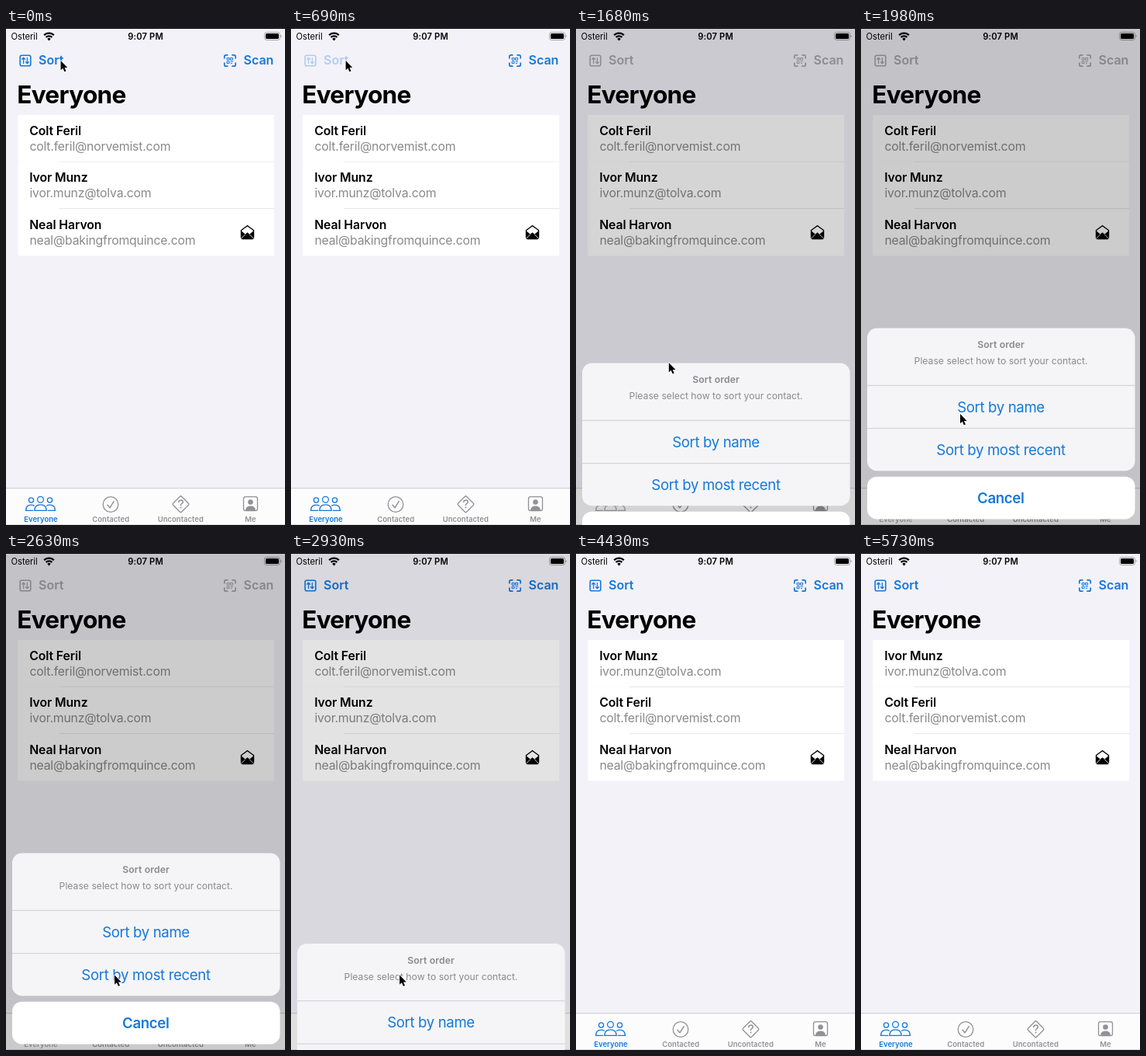
An HTML page for the animation above (5.98 s loop, 360 px wide and 640 px high).

```html
<!DOCTYPE html>
<html lang="en">
<head>
<meta charset="utf-8">
<title>Sorting contacts</title>
<style>
  html, body { margin: 0; width: 100%; height: 100%; overflow: hidden; background: #f3f2f9; }
  svg { display: block; width: 100%; height: 100%; }
  text { font-family: Inter, Roboto, "Liberation Sans", sans-serif; font-optical-sizing: none; }
  .status { font-size: 11.2px; }
  .time { font-size: 11.2px; font-weight: 600; letter-spacing: .15px; }
  .nav { font-size: 16px; font-weight: 600; }
  .title { font-size: 31.6px; font-weight: 700; letter-spacing: -.7px; }
  .name { font-size: 15.8px; font-weight: 600; letter-spacing: -.1px; }
  .mail { font-size: 15.8px; letter-spacing: -.2px; fill: #8a8a8d; }
  .tab { font-size: 9.5px; font-weight: 600; }
  .head { font-size: 12.2px; font-weight: 600; letter-spacing: .15px; fill: #8a8a8e; }
  .note { font-size: 12.2px; fill: #8a8a8e; }
  .choice { font-size: 18.6px; letter-spacing: -.35px; fill: #1578db; }
  .cancel { font-weight: 600; }
  .mid { text-anchor: middle; }
  .line { fill: none; stroke: currentColor; stroke-width: 1.3; stroke-linecap: round; stroke-linejoin: round; }
  .fill { fill: currentColor; }
</style>
</head>
<body>
<svg viewBox="0 0 360 640" xmlns="http://www.w3.org/2000/svg">
  <rect width="360" height="640" fill="#f3f2f9"/>

  <!-- status bar -->
  <text class="status" x="6.5" y="15">Osteril</text>
  <g fill="none" stroke="#000" stroke-width="2.3">
    <path d="M49.2 9.3a8.6 8.6 0 0 1 12.6 0"/>
    <path d="M51.6 12a5.3 5.3 0 0 1 7.8 0"/>
  </g>
  <path d="M55.5 16.4l-2.2-2.4a3 3 0 0 1 4.4 0z"/>
  <text class="time mid" x="180" y="15">9:07 PM</text>
  <rect x="333.5" y="5.5" width="20" height="10" rx="2.8" fill="none" stroke="#a4a4a8"/>
  <rect x="335" y="7" width="17" height="7" rx="1.5"/>
  <path d="M354.6 8.8v3.4q1.3-.5 1.3-1.7t-1.3-1.7z" fill="#a4a4a8"/>

  <!-- navigation bar -->
  <g id="sort">
    <rect class="line" x="18.2" y="35.2" width="13.6" height="13.6" rx="2" style="stroke-width:1.6"/>
    <path class="line" d="M22.6 45.5v-7M20.7 40.3l1.9-2 1.9 2M27.4 38.5v7M25.5 43.7l1.9 2 1.9-2"/>
    <text class="nav fill" x="42" y="47.3">Sort</text>
  </g>
  <g id="scan">
    <path class="line" style="stroke-width:1.7" d="M281.8 38.8v-2q0-2 2-2h2M292 34.8h2.2q2 0 2 2v2M296.2 45v2.2q0 2-2 2H292M285.8 49.2h-2q-2 0-2-2V45"/>
    <path class="line" style="stroke-width:1" d="M285.5 38.5h2.6v2.6h-2.6zM290 38.5h2.6v2.6H290zM285.5 43h2.6v2.6h-2.6zM290 43.2h2.6M290.4 45.6h1.2"/>
    <text class="nav fill" x="306.5" y="47.3">Scan</text>
  </g>
  <text class="title" x="14.2" y="97">Everyone</text>

  <g id="list"></g>

  <!-- tab bar -->
  <rect y="593" width="360" height="47" fill="#fcfcfd"/>
  <rect y="592.4" width="360" height=".8" fill="#c4c4c8"/>
  <rect y="639" width="360" height="1" fill="#dcdce0"/>
  <g id="everyone">
    <circle class="line" cx="44.5" cy="607.2" r="3.9"/>
    <path class="line" d="M36.8 621.4q0-7.6 7.7-7.6t7.7 7.6z"/>
    <circle class="line" cx="32.5" cy="608" r="3.1"/>
    <path class="line" d="M34.8 621.4h-9.2q0-7.3 6.9-7.3 2.4 0 3.9 1.1"/>
    <circle class="line" cx="56.5" cy="608" r="3.1"/>
    <path class="line" d="M54.2 621.4h9.2q0-7.3-6.9-7.3-2.4 0-3.9 1.1"/>
    <text class="tab fill mid" x="45" y="636.4">Everyone</text>
  </g>
  <g color="#929296">
    <circle class="line" cx="135" cy="613.5" r="9.8"/>
    <path class="line" style="stroke-width:1.5" d="M131 614.2l3 3.6 5.2-8.2"/>
    <text class="tab fill mid" x="135.2" y="636.4">Contacted</text>
    <g transform="translate(0 -.8)">
      <rect class="line" x="217.7" y="606.2" width="15.6" height="15.6" rx="1.8" transform="rotate(45 225.5 614)"/>
      <path class="line" style="stroke-width:1.5" d="M222.8 611.3q.2-2.6 2.8-2.6 2.7 0 2.7 2.3 0 1.4-1.5 2.2-1.3.7-1.3 2.1"/>
      <circle class="fill" cx="225.5" cy="618.2" r="1"/>
    </g>
    <text class="tab fill mid" x="225.3" y="636.4">Uncontacted</text>
    <rect class="line" x="306.5" y="603.7" width="18" height="18" rx="2.6"/>
    <circle class="fill" cx="315.5" cy="610.5" r="3.3"/>
    <path class="fill" d="M309 621.3q.3-5.8 6.5-5.8t6.5 5.8z"/>
    <text class="tab fill mid" x="315.5" y="636.4">Me</text>
  </g>

  <rect id="dim" width="360" height="640" fill="#000"/>
  <rect width="360" height="1"/>

  <!-- action sheet -->
  <g id="sheet">
    <rect x="8" y="386.5" width="345.5" height="183.7" rx="12.5" fill="#f5f5f7"/>
    <path d="M8 460.3h345.5M8 515.6h345.5" stroke="#cbcbcf" stroke-width=".9"/>
    <text class="head mid" x="180.6" y="412.3">Sort order</text>
    <text class="note mid" x="180.6" y="433.3">Please select how to sort your contact.</text>
    <text class="choice mid" x="180.5" y="494.7">Sort by name</text>
    <text class="choice mid" x="180.5" y="549.7">Sort by most recent</text>
    <rect x="8" y="577.7" width="345.5" height="54.8" rx="12.5" fill="#fff"/>
    <text class="choice cancel mid" x="180.3" y="611.8">Cancel</text>
  </g>

  <path id="cursor" d="M0 0v12.2l2.8-2.5 2 4.6 2.1-.9-2-4.5h3.8z" stroke="#fff" stroke-width="1.4" stroke-linejoin="round" paint-order="stroke"/>
</svg>
<script>
const LOOP = 5980;
const ROW = 60.4;
const SHEET_HEIGHT = 253.5;
const BLUE = "#1578db";
const GREY = "#a7a7ac";
const el = id => document.getElementById(id);

const people = [
  ["Colt Feril", "colt.feril@norvemist.com"],
  ["Ivor Munz", "ivor.munz@tolva.com"],
  ["Neal Harvon", "neal@bakingfromquince.com"]
];

const envelope = `
  <path d="M302.8 260.2l8.7-6.4 8.7 6.4v9.6q0 2.4-2.4 2.4h-12.6q-2.4 0-2.4-2.4z"/>
  <path d="M304.2 260.8l7.3-5.4 7.3 5.4v.9l-4.5 3.8-2.8-2.3-2.8 2.3-4.5-3.8z" fill="#fff"/>
  <path d="M303.4 271.2l5.5-5.6M319.6 271.2l-5.5-5.6" stroke="#fff" stroke-width=".9"/>`;

// each row carries its own separator, so it stays intact while rows swap
el("list").innerHTML = people.map(([name, mail], i) => {
  const top = 112 + i * ROW;
  const last = i === people.length - 1;
  return `<g class="row">
    <rect x="15.3" y="${top}" width="330.7" height="${ROW + .2}" fill="#fff"/>
    <text class="name" x="30.2" y="${top + 26}">${name}</text>
    <text class="mail" x="30.4" y="${top + 45.8}">${mail}</text>
    ${last ? envelope : `<rect x="69" y="${top + ROW - .5}" width="277" height=".5" fill="#c0c0c4"/>`}
  </g>`;
}).join("");
const rows = document.querySelectorAll(".row");

// time, sheet offset below its resting place
const sheetKeys = [
  [939, 254], [940, 171.5], [1000, 171.5], [1040, 95], [1140, 45], [1680, 45],
  [1730, 24], [1780, 10], [1880, 0], [2880, 0], [2930, 116.5], [3030, 200], [3130, 254]
];
// time, x, y of the pointer tip
const cursorKeys = [
  [1380, 70.6, 42], [1430, 72, 56], [1530, 92, 221], [1630, 115, 403], [1680, 119.8, 431],
  [1980, 128, 497], [2480, 140.1, 543.5], [4080, 140.1, 543.5], [4380, 87, 33]
];

function track(keys, t) {
  if (t <= keys[0][0]) return keys[0].slice(1);
  for (let i = 1; i < keys.length; i++) {
    const [a, b] = [keys[i - 1], keys[i]];
    if (t <= b[0]) {
      const k = (t - a[0]) / (b[0] - a[0]);
      return a.slice(1).map((v, j) => v + (b[j + 1] - v) * k);
    }
  }
  return keys[keys.length - 1].slice(1);
}

const shift = (node, x, y) => node.setAttribute("transform", `translate(${x} ${y})`);

// the screen refreshes every 50 ms
function tick(t) {
  const phase = t < 1280 ? 40 : 30;
  return Math.max(0, Math.floor((t - phase) / 50) * 50 + phase);
}

function draw(time) {
  const t = tick(time);
  const [offset] = track(sheetKeys, t);
  shift(el("sheet"), 0, offset);
  el("dim").setAttribute("opacity", Math.max(0, .2 * (1 - offset / SHEET_HEIGHT)));

  const modal = t >= 940 && t < 2930;
  for (const id of ["sort", "scan", "everyone"]) el(id).setAttribute("color", modal ? GREY : BLUE);
  el("sort").setAttribute("opacity", t >= 690 && t < 940 ? .3 : 1);

  const k = Math.min(1, Math.max(0, (t - 3030) / 350));
  const swap = k * k * (3 - 2 * k) * ROW;
  shift(rows[0], 0, swap);
  shift(rows[1], 0, -swap);

  shift(el("cursor"), ...track(cursorKeys, t));
  el("cursor").setAttribute("visibility", t < 4430 ? "visible" : "hidden");
}

const start = performance.now();
function loop() {
  draw((performance.now() - start) % LOOP);
  requestAnimationFrame(loop);
}
loop();
</script>
</body>
</html>
```
